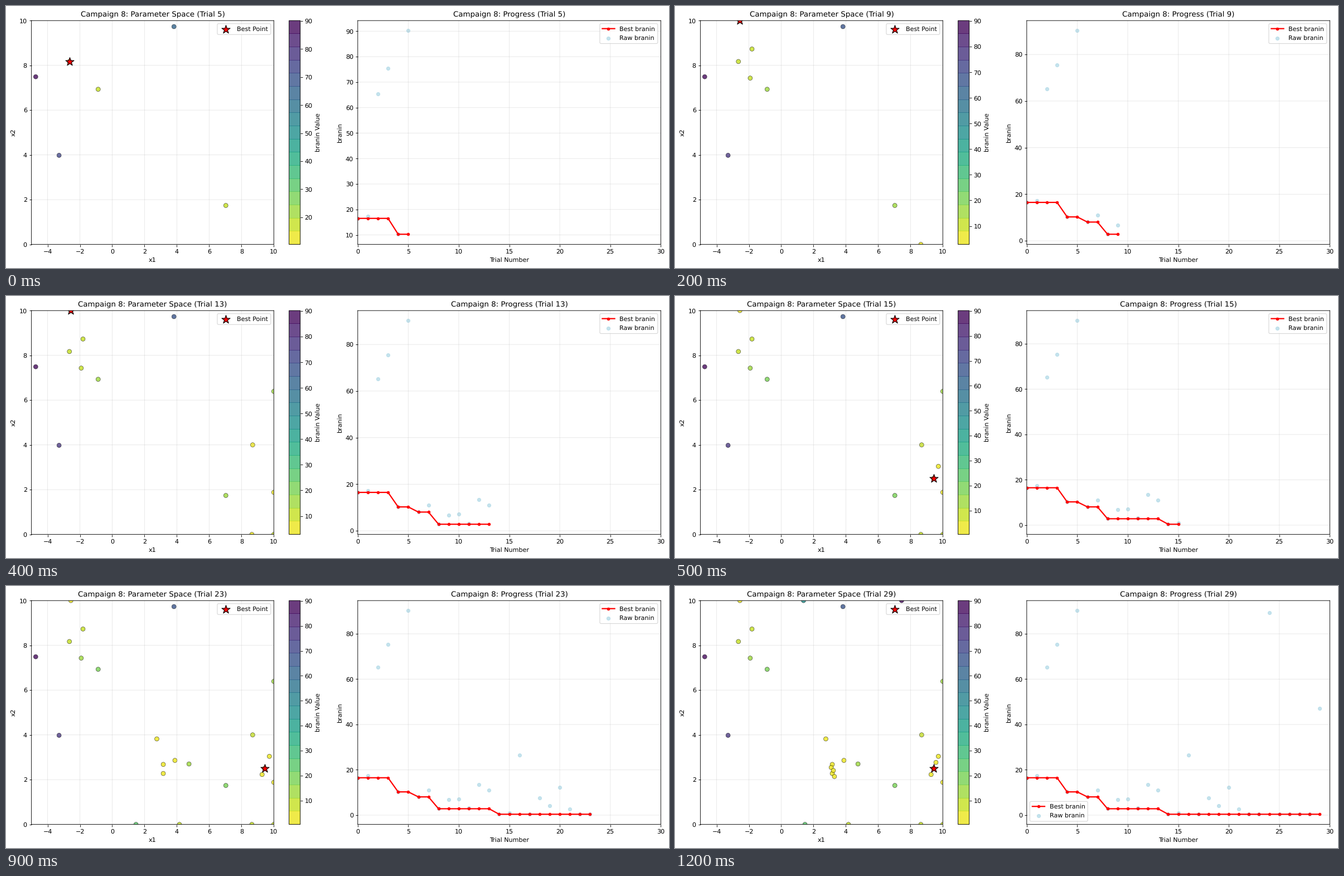
Recreate the animation shown at these times as a matplotlib script. Size 1189 by 471 pixels, loop 1300 ms.

```python
from itertools import count

import numpy as np
import matplotlib.pyplot as plt
from matplotlib.animation import FuncAnimation
from matplotlib.colors import ListedColormap

WIDTH, HEIGHT, DPI = 1189, 471, 80
TOP, BOTTOM = 26.2, 428.6
N_FRAMES, INTERVAL = 13, 100
FIRST_TRIAL, TRIALS_PER_FRAME = 5, 2
BANDS = 17

# Soft, unhinted edges and letter spacing
plt.rcParams.update({"font.family": "DejaVu Sans", "text.hinting": "none",
                     "path.snap": False})


def branin(x1, x2):
    bowl = x2 - 5.1 / (4 * np.pi ** 2) * x1 ** 2 + 5 / np.pi * x1 - 6
    return bowl ** 2 + 10 * (1 - 1 / (8 * np.pi)) * np.cos(x1) + 10


def refine_left():
    """Zigzag up through the minimum at x1 = pi."""
    for i in count():
        k = (4 + 2 * i) % 5
        yield np.pi + 0.1 - 0.033 * k + 0.05 * (-1) ** k, 2.14 + 0.135 * k


def refine_right():
    """Diagonal through the minimum at x1 = 3 pi."""
    for i in count():
        k = (1 + 2 * i) % 5 - 1
        yield 3 * np.pi + 0.15 * k, 2.5 + 0.27 * k


def search():
    """Wide exploration of the whole space."""
    yield from [
        (-0.87, 6.93), (7.03, 1.74), (3.82, 9.73), (-3.29, 3.98),
        (-2.65, 8.17), (-4.735, 7.49), (-1.81, 8.73), (-1.92, 7.43),
        (-2.56, 10), (8.64, 0), (8.69, 4), (10, 1.88), (10, 6.39), (10, 0),
        (1.47, 0), (4.16, 0), (3.88, 2.86), (4.75, 2.7), (2.76, 3.82),
        (7.45, 10), (1.38, 10),
    ]


def run_campaign():
    steps = {"s": search(), "l": refine_left(), "r": refine_right()}
    order = "s" * 14 + "rrsrssssllslrlls"
    return np.array([next(steps[kind]) for kind in order])


POINTS = run_campaign()
VALUES = branin(*POINTS.T)
BEST = np.minimum.accumulate(VALUES)
CMAP = ListedColormap(plt.get_cmap("viridis_r")((np.arange(BANDS) + 0.5) / BANDS))

fig = plt.figure(figsize=(WIDTH / DPI, HEIGHT / DPI), dpi=DPI, facecolor="white")


def add_axes(left, right):
    return fig.add_axes([left / WIDTH, 1 - BOTTOM / HEIGHT,
                         (right - left) / WIDTH, (BOTTOM - TOP) / HEIGHT])


def draw_space(trial):
    ax = add_axes(45.6, 480.3)
    x1, x2 = POINTS[:trial + 1].T
    values = VALUES[:trial + 1]
    dots = ax.scatter(x1, x2, c=values, cmap=CMAP, s=50, alpha=0.8,
                      edgecolors="black", linewidths=0.5)
    best = np.argmin(values)
    ax.scatter(x1[best], x2[best], c="red", s=200, marker="*",
               edgecolors="black", linewidths=1, label="Best Point")
    ax.set(xlim=(-5, 10), ylim=(0, 10), xlabel="x1", ylabel="x2",
           title=f"Campaign 8: Parameter Space (Trial {trial})")
    ax.set_xticks(range(-4, 11, 2))
    ax.grid(alpha=0.3)
    ax.legend(loc="upper right")
    fig.colorbar(dots, cax=add_axes(507.6, 527.7), label="branin Value")


def draw_progress(trial):
    ax = add_axes(630.8, 1174.3)
    trials = np.arange(trial + 1)
    ax.plot(trials, BEST[:trial + 1], "ro-", linewidth=2, markersize=4,
            label="Best branin")
    ax.scatter(trials, VALUES[:trial + 1], c="lightblue", s=30, alpha=0.7,
               label="Raw branin")
    ax.set(xlim=(0, 30), xlabel="Trial Number", ylabel="branin",
           title=f"Campaign 8: Progress (Trial {trial})")
    ax.grid(alpha=0.3)
    # The legend makes room for the high value at trial 24
    ax.legend(loc="upper right" if trial < 24 else "lower left")


def update(frame):
    fig.clear()
    trial = FIRST_TRIAL + TRIALS_PER_FRAME * frame
    draw_space(trial)
    draw_progress(trial)
    return []


anim = FuncAnimation(fig, update, frames=N_FRAMES, interval=INTERVAL,
                     init_func=lambda: [], repeat=True, repeat_delay=0)
plt.show()
```
